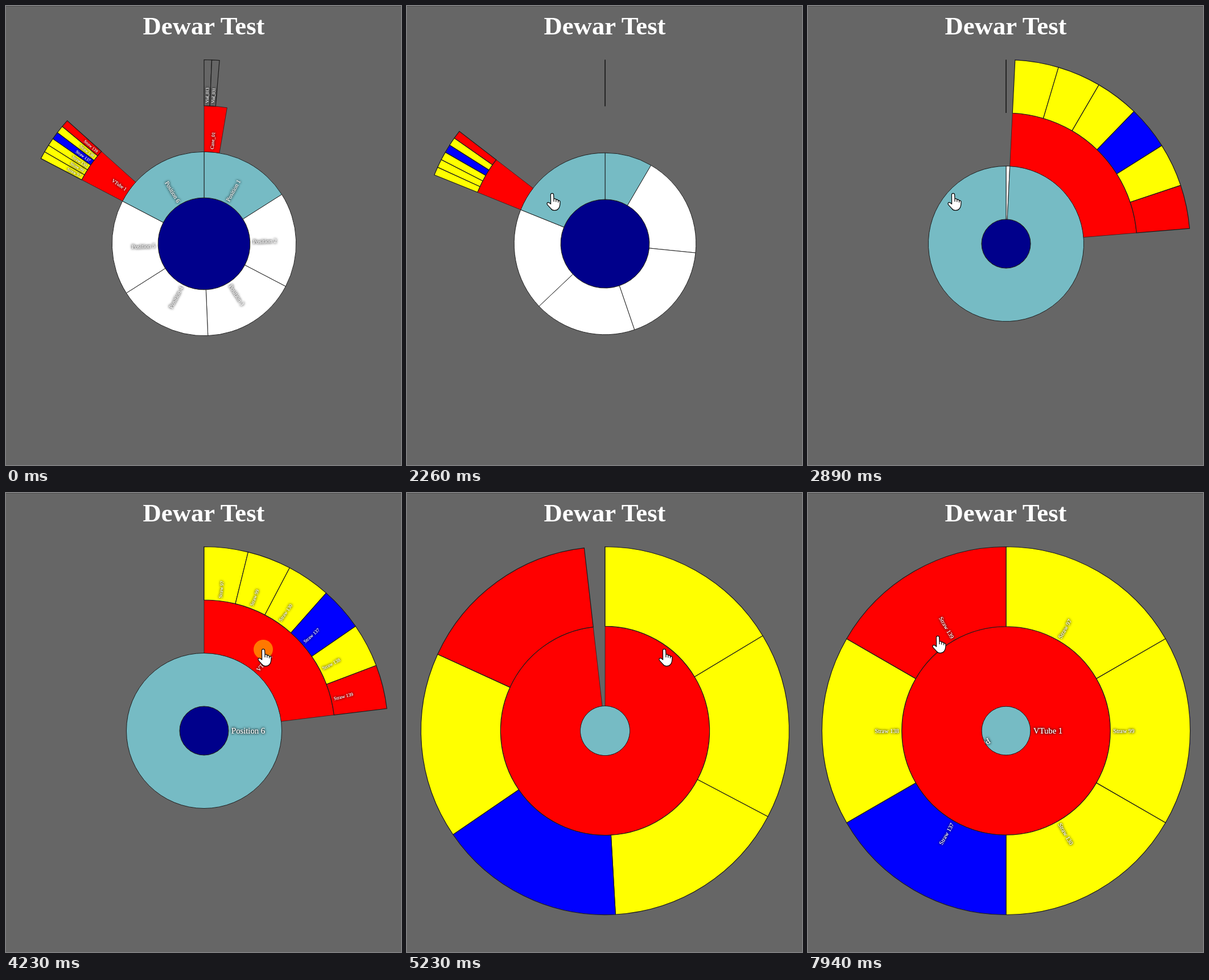
These frames come from a looping animation (694x807 px, 8 s). An HTML page with a canvas:

```html
<!DOCTYPE html>
<html lang="en">
<head>
<meta charset="utf-8">
<title>Dewar Test</title>
<style>
  html, body { margin: 0; width: 100%; height: 100%; overflow: hidden; background: #666; }
  body { position: relative; }
  canvas { position: absolute; left: 0; top: 0; }
  h1 {
    position: absolute; left: 0; top: 10px; width: 695px; margin: 0;
    font: bold 44.7px/50px "Liberation Serif", "Times New Roman", serif;
    color: #fff; text-align: center;
  }
</style>
</head>
<body>
<canvas id="stage" width="694" height="807"></canvas>
<h1>Dewar Test</h1>
<script>
const ctx = document.getElementById('stage').getContext('2d');
const LOOP = 8000, TAU = Math.PI * 2;
const CX = 348, CY = 418, R = 323.5, HUB = 43;
const FONT = '"Liberation Serif", "Times New Roman", serif';
const LINE_WIDTH = [1.2, .95, .7, 1.2];

// Partition tree: depth, first leaf, leaf count, fill, label
const node = (depth, x, n, fill, label) => ({ depth, x, n, fill, label });
const root = node(0, 0, 150, '#00008b', '');
const positions = Array.from({ length: 6 }, (_, i) =>
  node(1, i && 25 * i - 1, i === 0 ? 24 : i === 5 ? 26 : 25,
    i % 5 ? '#fff' : '#76bbc4', 'Position ' + (i + 1)));
const tube = node(2, 124, 6, '#f00', 'VTube 1');
const straws = [97, 99, 130, 137, 138, 139].map((id, i) =>
  node(3, tube.x + i, 1, id === 137 ? '#00f' : id === 139 ? '#f00' : '#ff0', 'Straw ' + id));
const nodes = [
  root, ...positions,
  node(2, 0, 4, '#f00', 'Cane_01'),
  node(3, 0, 1, '#666', 'Vial_013'),
  node(3, 1, 1, '#666', 'Vial_031'),
  tube, ...straws
];

// Each click zooms one level further in
const focus = [root, positions[5], tube];
const views = focus.map(f => [f.x, f.x + f.n, f.depth, f === root ? 0 : HUB]);
const zooms = [{ start: 1970, span: 995 }, { start: 4305, span: 1042 }];
const HIDE = 20, FADE = 290, PRESS = 120;

// Pointer moves: start, end, then the points of a Bezier curve
const moves = [
  [560, 1200, [529, 721], [185, 300]],
  [1430, 1660, [185, 300], [255, 330]],
  [3440, 3990, [255, 330], [452, 275]],
  [6560, 7310, [461, 272], [500, 200], [600, 330], [481, 422]],
  [7410, 7940, [481, 422], [440, 565], [270, 515], [228, 252]]
];

const clamp = (v, a, b) => Math.min(b, Math.max(a, v));
const mix = (a, b, p) => a + (b - a) * p;
const progress = (t, from, to) => clamp((t - from) / (to - from), 0, 1);
const cubic = t => t < .5 ? 4 * t ** 3 : 1 - 4 * (1 - t) ** 3;
const smooth = t => t * t * (3 - 2 * t);

function bezier(pts, p) {
  while (pts.length > 1)
    pts = pts.slice(1).map((b, i) => b.map((v, k) => mix(pts[i][k], v, p)));
  return pts[0];
}

function viewAt(t) {
  let view = views[0], level = 0, alpha = 1;
  zooms.forEach(({ start, span }, i) => {
    if (t < start) return;
    const end = start + span, p = cubic(progress(t, start, end));
    view = views[i].map((v, k) => mix(v, views[i + 1][k], p));
    if (t < start + HIDE) return;
    level = i + 1;
    alpha = progress(t, end, end + FADE);
  });
  return { view, level, alpha };
}

function drawArc(n, a0, a1, r0, r1) {
  const from = a0 - TAU / 4, to = a1 - TAU / 4;
  ctx.beginPath();
  if (a1 - a0 > TAU - 1e-4) {
    ctx.arc(0, 0, r1, 0, TAU);
    if (r0 > 0) {
      ctx.moveTo(r0, 0);
      ctx.arc(0, 0, r0, 0, TAU, true);
    }
  } else {
    ctx.arc(0, 0, r1, from, to);
    ctx.arc(0, 0, r0, to, from, true);
    ctx.closePath();
  }
  ctx.fillStyle = n.fill;
  ctx.fill();
  ctx.strokeStyle = '#1c1c1c';
  ctx.lineWidth = LINE_WIDTH[n.depth];
  ctx.stroke();
}

function drawLabel(n, mid, r, level, alpha) {
  const turn = n === focus[level] ? 0 : mid - TAU / 4;
  const flip = turn > TAU / 4 + 1e-6;
  const size = 14.67 / Math.sqrt(Math.max(1, n.depth - level + 1));
  ctx.save();
  ctx.globalAlpha = alpha;
  ctx.rotate(turn);
  ctx.translate(r + 5, 0);
  if (flip) ctx.rotate(Math.PI);
  ctx.font = size + 'px ' + FONT;
  ctx.textAlign = flip ? 'right' : 'left';
  ctx.fillStyle = '#fff';
  ctx.shadowColor = '#000';
  ctx.shadowBlur = 4;
  // The second pass deepens the halo
  for (let pass = 0; pass < 2; pass++) ctx.fillText(n.label, 0, size * .34);
  ctx.restore();
}

function drawWheel(t) {
  const { view: [x0, x1, d0, inner], level, alpha } = viewAt(t);
  const angle = x => (x - x0) / (x1 - x0) * TAU;
  const radius = d => inner + (R - inner) * (d - d0) / (4 - d0);
  ctx.save();
  ctx.translate(CX, CY);
  for (const n of nodes) {
    const a0 = clamp(angle(n.x), 0, TAU), a1 = clamp(angle(n.x + n.n), 0, TAU);
    const r0 = radius(n.depth), r1 = radius(n.depth + 1);
    const empty = a1 - a0 < 1e-6 && n.depth < 3;
    if (r1 > 0 && !empty) drawArc(n, a0, a1, Math.max(0, r0), r1);
    if (n.label && alpha > 0 && (!level || n.x >= tube.x))
      drawLabel(n, angle(n.x + n.n / 2), r0, level, alpha);
  }
  ctx.restore();
}

const hand = new Path2D(
  'M-2.6 1.8Q-2.4 -.6 0 -.6Q2.4 -.6 2.6 1.8L3 9Q5.8 8 6.8 10.4Q9.4 9.4 10.6 12' +
  'Q14 11.6 14 15Q14 23 11 26.4Q8.6 29.4 4.4 29.4Q.2 29.6 -2 26.4' +
  'L-8.4 19.4Q-10 16.4 -7.4 15.4Q-5.2 14.8 -2.4 18.2Z');
const creases = new Path2D('M3 9V14M6.8 10.6V14.6M10.6 12V15.4');
const arrow = new Path2D('M0 0V22L5 17.4L8.6 25.6L12 24L8.4 16.2H15.6Z');

function drawPointer(t) {
  const move = moves.filter(m => m[0] <= t).pop();
  if (!move) return;
  const [from, to, ...pts] = move;
  const [x, y] = bezier(pts, smooth(progress(t, from, to)));
  const over = move !== moves[0] || t > 1150 || Math.hypot(x - CX, y - CY) < R / 2;

  ctx.save();
  ctx.translate(x, y);
  if (zooms.some(z => t >= z.start - PRESS && t < z.start + HIDE)) {
    ctx.beginPath();
    ctx.arc(0, 0, 17, 0, TAU);
    ctx.fillStyle = 'rgba(255,255,0,.47)';
    ctx.fill();
  }
  ctx.fillStyle = '#fff';
  ctx.strokeStyle = '#000';
  ctx.lineWidth = 1.2;
  ctx.lineJoin = 'round';
  ctx.fill(over ? hand : arrow);
  ctx.stroke(over ? hand : arrow);
  if (over) ctx.stroke(creases);
  ctx.restore();
}

function draw(t) {
  ctx.fillStyle = '#666';
  ctx.fillRect(0, 0, 694, 807);
  ctx.fillStyle = '#505050';
  ctx.fillRect(0, 0, 694, 1);
  drawWheel(t);
  drawPointer(t);
}

const begin = performance.now();
function tick() {
  draw((performance.now() - begin) % LOOP);
  requestAnimationFrame(tick);
}
tick();
</script>
</body>
</html>
```
